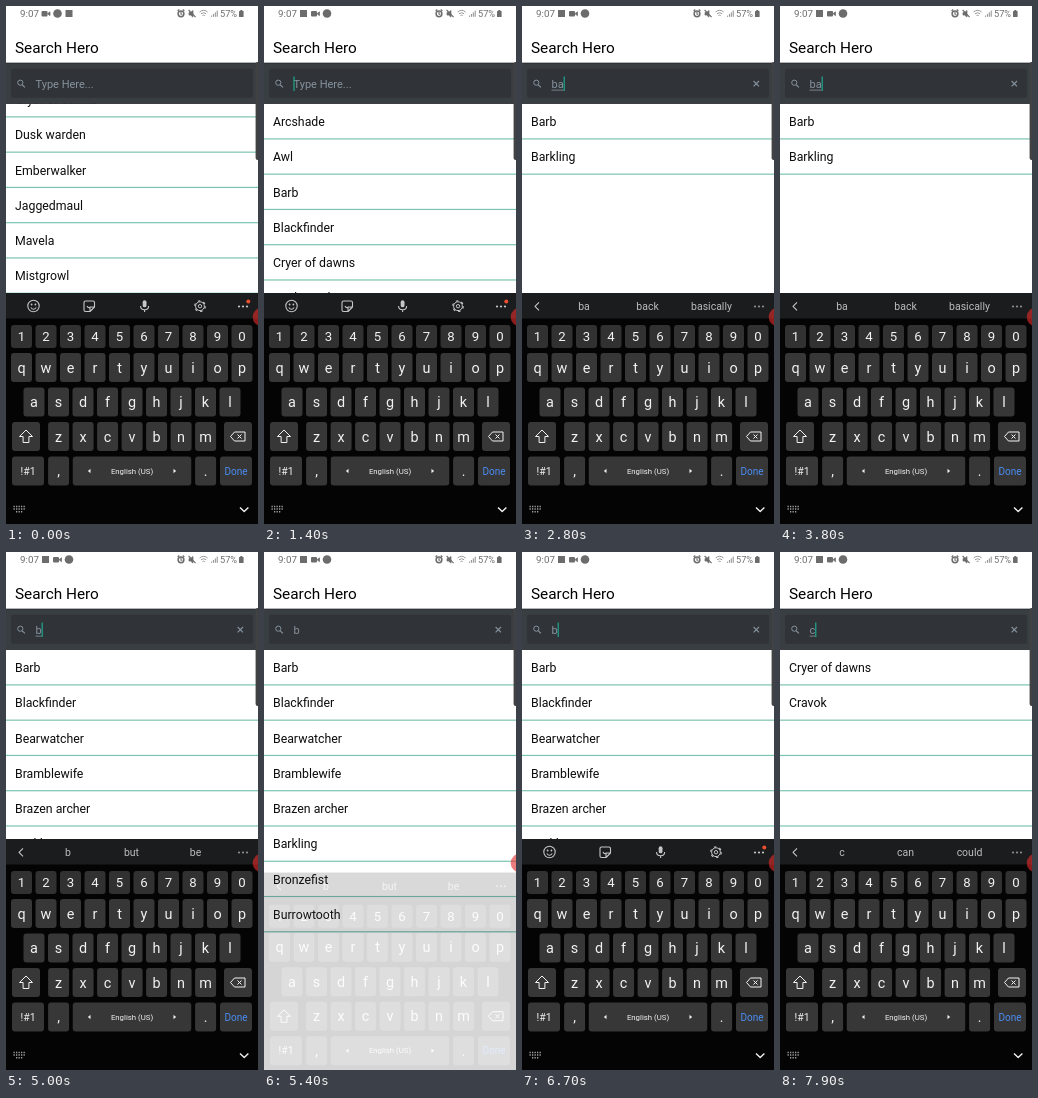
Recreate the animation shown at these times as an HTML page. Size 252 by 518 pixels, loop 8000 ms.

```html
<!DOCTYPE html>
<html lang="en">
<head>
<meta charset="utf-8">
<title>Search Hero</title>
<style>
  html, body { margin: 0; width: 252px; height: 518px; overflow: hidden; background: #fff; }
  svg { display: block; font-family: Roboto, sans-serif; }
</style>
</head>
<body>
<svg id="stage" width="252" height="518" viewBox="0 0 252 518">
  <clipPath id="listClip"><rect y="97.5" width="252" height="421"/></clipPath>
</svg>
<script>
const LOOP = 8000, STEP = 100, PITCH = 35.27, ROWS = 18;
const HEROES = ['Arcshade', 'Awl', 'Barb', 'Blackfinder', 'Cryer of dawns', 'Dusk warden',
  'Emberwalker', 'Jaggedmaul', 'Mavela', 'Mistgrowl', 'Bearwatcher', 'Bramblewife',
  'Brazen archer', 'Barkling', 'Bronzefist', 'Burrowtooth', 'Cravok'];

// Each track holds [start ms, value] steps.
const tracks = {
  text: [[0, ''], [1900, 'b'], [2400, 'ba'], [4000, 'b'], [7100, ''], [7700, 'c']],
  filter: [[0, ''], [2000, 'b'], [2800, 'ba'], [4200, 'b'], [7200, ''], [7800, 'c']],
  blankRows: [[0, 0], [4000, 5], [4200, 0], [7800, 5]],
  clear: [[0, 0], [1900, 1], [7200, 0], [7700, 1]],
  words: [[0, ''], [1900, 'b but be'], [2500, 'ba back basically'], [4200, 'b but be'],
    [5600, ''], [7700, 'c can could']],
  composing: [[0, 1], [5100, 0], [7700, 1]],
  caret: [[0, 0], [400, 1], [900, 0], [1400, 1], [2900, 0], [3400, 1], [4500, 0],
    [5000, 1], [5100, 0], [6400, 1], [7000, 0], [7100, 1], [7600, 0], [7700, 1]],
  key: [[0, ''], [1800, 'b'], [1900, ''], [2300, 'a'], [2400, ''], [3900, 'del'], [4000, ''],
    [7000, 'del'], [7100, ''], [7600, 'c'], [7700, '']]
};
const at = (name, t) => tracks[name].filter(s => s[0] <= t).pop()[1];
const clamp = v => Math.max(0, Math.min(1, v));

const stage = document.getElementById('stage');
function el(tag, attrs, parent = stage) {
  const node = document.createElementNS('http://www.w3.org/2000/svg', tag);
  set(node, attrs);
  return parent.appendChild(node);
}
function set(node, attrs) {
  for (const k in attrs) node.setAttribute(k, attrs[k]);
}
const show = (node, on) => set(node, { visibility: on ? 'visible' : 'hidden' });
const group = (parent, attrs = {}) => el('g', attrs, parent);
const rect = (parent, x, y, width, height, fill, rx = 0) =>
  el('rect', { x, y, width, height, fill, rx }, parent);
const circle = (parent, cx, cy, r, fill) => el('circle', { cx, cy, r, fill }, parent);
const ring = (parent, cx, cy, r, stroke, width = 1) =>
  el('circle', { cx, cy, r, stroke, fill: 'none', 'stroke-width': width }, parent);
const path = (parent, d, stroke, width = 1, fill = 'none') =>
  el('path', { d, stroke, fill, 'stroke-width': width, 'stroke-linejoin': 'round' }, parent);
function label(parent, x, y, size, fill, str, anchor = 'start') {
  const node = el('text', { x, y, fill, 'font-size': size, 'text-anchor': anchor }, parent);
  node.textContent = str;
  return node;
}

// List
const list = group(stage, { 'clip-path': 'url(#listClip)' });
const scroller = group(list);
const rows = Array.from({ length: ROWS }, (_, i) => {
  const g = group(scroller, { transform: `translate(0 ${i * PITCH})` });
  rect(g, 0, 132.3, 252, 1.2, '#7cc4b2');
  return { g, name: label(g, 9, 120, 12.3, '#0c0c0c', '') };
});
const thumb = rect(list, 247, 98, 2, 142, '#777', 1);

// Status bar and title
const GREY = '#6c6c6c', PALE = '#8c8c8c';
label(stage, 14, 11.1, 9.8, GREY, '9:07');
const square = rect(stage, -3.5, 4, 7, 7, GREY);
const camera = group(stage);
rect(camera, -4.5, 5, 6, 5.5, GREY, 1);
path(camera, 'M1.5 7.7L4 5.8V9.7Z', GREY, .7, GREY);
const disc = circle(stage, 0, 7.5, 4.3, GREY);
ring(stage, 175, 7.8, 2.9, GREY, 1.5);
path(stage, 'M171.6 5l1.6-1.5M178.4 5l-1.6-1.5M175 6V8.2h1.4', GREY, 1.1);
path(stage, 'M183 6.5h1.6l2.4-2v6.6l-2.4-2H183Z', GREY, .7, GREY);
path(stage, 'M182.6 4l7 7.2', GREY, 1.1);
path(stage, 'M193.6 6q4-3.4 8 0M195 7.8q2.6-2.2 5.2 0M196.500 9.600q1.100-.9 2.200 0', PALE, .9);
path(stage, 'M205.5 10.800V9.600M207.400 10.800V8M209.300 10.800V6.400M211.200 10.800V4.600', PALE);
label(stage, 214, 11.1, 9.2, GREY, '57%');
rect(stage, 233, 5, 4.6, 6, GREY, .6);
rect(stage, 234.3, 4, 2, 1.5, GREY);
label(stage, 9, 47.2, 15.35, '#000', 'Search Hero');

// Search bar
rect(stage, 0, 56.8, 252, 41, '#393e42');
rect(stage, 0, 56.8, 252, .6, '#23262a');
rect(stage, 0, 97.2, 252, .6, '#23262a');
rect(stage, 5, 62.8, 242, 29, '#303337', 2);
const MUTED = '#86939e';
ring(stage, 14.3, 76.7, 2.6, MUTED);
path(stage, 'M16.3 78.8L18.9 81.4', MUTED, 1.2);
const input = label(stage, 29.5, 82, 11.03, MUTED, '');
const underline = rect(stage, 29.5, 83.7, 6, .8, MUTED);
const caret = rect(stage, 29, 70.5, 1.2, 14.5, '#1fa88f');
const clear = path(stage, 'M231.6 75l5.4 5.4M237 75l-5.4 5.4', MUTED, 1.1);

// Keyboard
const board = group(stage);
rect(board, 0, 287, 252, 240, '#040405');
rect(board, 0, 287, 252, 25.5, '#1b1c1d');
const INK = '#f2f2f2', DIM = '#c6c6c6', KEY = '#373738', DOWN = '#545456';
const keys = {};
function key(id, cx, cy, w, h, size, fill = KEY, text = id, ink = INK) {
  keys[id] = { box: rect(board, cx - w / 2, cy - h / 2, w, h, fill, 3), fill };
  if (text) label(board, cx, cy + size * .35, size, ink, text, 'middle');
}
const keyRow = (chars, x, y, h, size, fill) =>
  [...chars].forEach((c, i) => key(c, x + i * 24.5, y, 21, h, size, fill));
keyRow('1234567890', 15.5, 330.5, 23, 13.2, '#313132');
keyRow('qwertyuiop', 15.5, 361.5, 29, 14.4);
keyRow('asdfghjkl', 28, 396, 29, 14.4);
keyRow('zxcvbnm', 52.6, 430.5, 29, 14.4);
key('shift', 20, 430.5, 28, 29, 0, KEY, '');
key('del', 232, 430.5, 28, 29, 0, KEY, '');
key('!#1', 22, 465, 32, 29, 10.5);
key(',', 52.6, 465, 21, 29, 14);
key('space', 126, 465, 118.5, 29, 7.8, KEY, 'English (US)');
key('.', 199.6, 465, 21, 29, 14);
key('Done', 230, 465, 32, 29, 10, KEY, 'Done', '#4a8df2');
path(board, 'M20 424l6.5 6.5h-3.6v6h-5.8v-6h-3.6Z', INK);
path(board, 'M224.5 430.5l4-4.5h10.5v9h-10.5ZM231.5 428.5l4 4M235.5 428.5l-4 4', INK);
path(board, 'M84.4 463.2v3.6l-2.4-1.8Z', INK, .3, INK);
path(board, 'M167.6 463.2v3.6l2.4-1.8Z', INK, .3, INK);
set(path(board, 'M7.5 500.5h12M7.5 503h12M10 505.700h7', '#a0a0a0', 1.4), { 'stroke-dasharray': '1.3 1.2' });
path(board, 'M234 501.5l4.2 4 4.2-4', INK, 1.4);
const dots = group(board);
for (const x of [233, 237, 241]) circle(dots, x, 300.5, 1.1);

// Toolbar icons
const tools = group(board);
ring(tools, 27.5, 300, 5.7, DIM, 1.1);
path(tools, 'M24.8 301.5q2.7 3.6 5.4 0', DIM, 1.1);
circle(tools, 25.6, 298.5, .9, DIM);
circle(tools, 29.4, 298.5, .9, DIM);
path(tools, 'M79.5 295h7.5q1.5 0 1.5 1.5v4.5l-4.5 4.5h-4.5q-1.5 0-1.5-1.5v-7.5q0-1.5 1.5-1.5ZM84 305.5v-4.5h4.5M81 300q1 2 2.5 1.5', DIM, 1.1);
rect(tools, 136.7, 294.3, 3.8, 7, DIM, 1.9);
path(tools, 'M134.6 300q0 3.800 4 3.800t4-3.800M138.600 304v2', DIM, 1.1);
ring(tools, 194, 300.2, 1.7, DIM);
ring(tools, 194, 300.2, 4.4, DIM);
set(ring(tools, 194, 300.2, 5.3, DIM, 1.2), { 'stroke-dasharray': '2.4 3.15' });
circle(tools, 242.3, 295.4, 2, '#ec4f2e');

// Word suggestions
const hints = group(board);
path(hints, 'M17 296.3l-4 4 4 4', DIM, 1.1);
const words = [62, 125.5, 189.5].map(x => label(hints, x, 304, 10.5, '#bcbcbc', '', 'middle'));

// Overlays at the right edge
rect(stage, 249.6, 56, 6, 98, '#404244', 2);
circle(stage, 256, 311, 9.3, 'rgba(226,44,44,.62)');

function drawList(t) {
  const filter = at('filter', t);
  const found = HEROES.filter(n => n.toLowerCase().startsWith(filter));
  const count = Math.max(found.length, at('blankRows', t));
  rows.forEach(({ g, name }, i) => {
    show(g, i < count);
    name.textContent = found[i] || '';
  });
  const p = clamp(t / 700);
  const scroll = 163.1 * (1 - p * p * (3 - 2 * p));
  set(scroller, { transform: `translate(0 ${-scroll})` });
  set(thumb, { y: 98 + scroll * .34, opacity: t < 100 ? 0 : .6 * clamp((1100 - t) / 300) });
}

function drawInput(t) {
  const text = at('text', t);
  input.textContent = text || 'Type Here...';
  const width = text ? input.getComputedTextLength() : 0;
  set(underline, { width });
  show(underline, text && at('composing', t));
  set(caret, { x: 29.4 + width });
  show(caret, at('caret', t));
  show(clear, at('clear', t));
}

function drawBoard(t) {
  const hidden = t < 5900 ? clamp((t - 5100) / 400) : clamp((6600 - t) / 400);
  set(board, { transform: `translate(0 ${45 * hidden})`, opacity: (1 - hidden) ** 1.32 });
  const pressed = at('key', t);
  for (const id in keys) set(keys[id].box, { fill: id === pressed ? DOWN : keys[id].fill });
  const line = at('words', t);
  set(tools, { display: line ? 'none' : 'inline' });
  set(hints, { display: line ? 'inline' : 'none' });
  set(dots, { fill: line ? '#8e8e8e' : DIM });
  line.split(' ').forEach((w, i) => words[i].textContent = w);
}

function drawStatus(t) {
  const xs = t < 300 ? [63, 40, 51.5] : [39.5, 51.5, 63];
  [square, camera, disc].forEach((icon, i) => set(icon, { transform: `translate(${xs[i]} 0)` }));
}

const start = performance.now();
function frame() {
  const t = Math.floor(((performance.now() - start) % LOOP) / STEP) * STEP;
  drawStatus(t);
  drawList(t);
  drawInput(t);
  drawBoard(t);
  requestAnimationFrame(frame);
}
frame();
</script>
</body>
</html>
```
